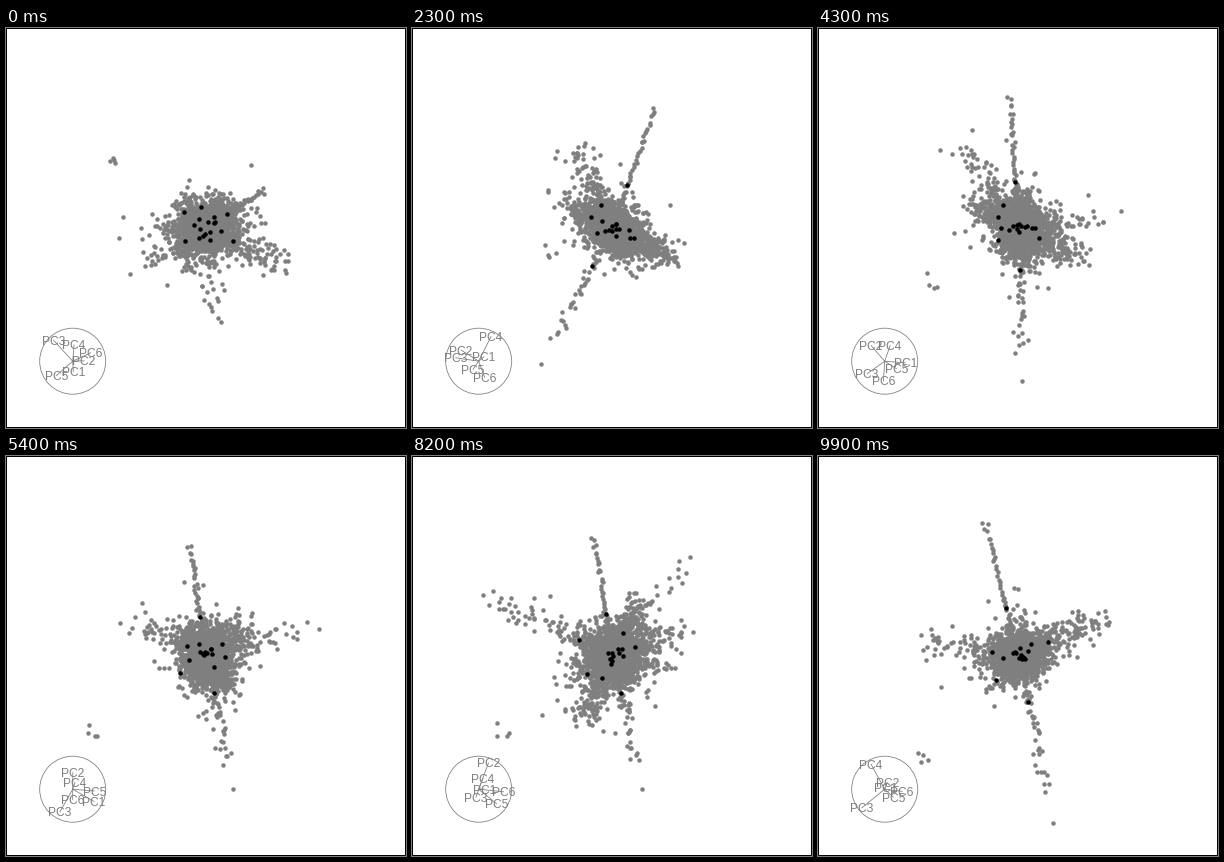
These frames come from a looping animation (400x400 px, 10000 ms). A matplotlib script:

```python
import numpy as np
import matplotlib.pyplot as plt
from matplotlib.animation import FuncAnimation
from matplotlib.patches import Circle, Rectangle

SIZE, FRAMES, INTERVAL = 400, 100, 100
GREY = "#7f7f7f"
PX = 0.72  # points per pixel
CENTRE = np.array([200.5, 199.5])
DIAL, RADIUS = np.array([66.7, 333.2]), 33
rng = np.random.default_rng(7)


def orthonormal(m):
    u, _, vt = np.linalg.svd(m, full_matrices=False)
    return u @ vt


# Stops of the tour: x row and y row of the projection of PC1..PC6.
STOPS = [0, 14, 31, 54, 68, 82, 99]
POSES = [orthonormal(np.array(p).T) for p in (
    [[.02, .35, -.59, .04, -.50, .55], [-.32, .01, .65, .50, -.44, .26]],
    [[-.17, -.20, -.74, .38, -.20, .44], [-.09, .455, .15, .82, -.09, -.27]],
    [[.40, -.74, -.50, .20, -.08, -.05], [.30, .24, .12, .545, -.33, -.64]],
    [[.65, 0, -.38, .07, .65, 0], [-.39, .515, -.70, .21, -.06, -.32]],
    [[.65, .17, .13, .55, .38, .36], [-.18, .97, .06, -.03, -.15, -.04]],
    [[.17, .29, -.08, .13, .56, .77], [0, .79, -.24, .33, -.45, -.09]],
    [[.02, .08, -.71, -.41, .26, .53], [.06, .21, -.58, .76, -.24, -.06]],
)]


def pose(k):
    """Constant-speed rotation between neighbouring stops."""
    i = min(np.searchsorted(STOPS, k, side="right") - 1, len(STOPS) - 2)
    t = (k - STOPS[i]) / (STOPS[i + 1] - STOPS[i])
    a, b = POSES[i], POSES[i + 1]
    angle = np.arccos(np.clip(np.sum(a * b) / 2, -1, 1))
    return orthonormal(np.sin((1 - t) * angle) * a + np.sin(t * angle) * b)


def noise(n):
    return np.clip(rng.normal(size=(n, 6)), -2.3, 2.3)


def arm(tip, n, power, spread):
    """Points along a ray, thinning out towards its tip."""
    t = np.linspace(0, 1, n)[:, None] ** power
    return t * tip + noise(n) * spread * (0.4 + 0.6 * t)


# Tips of the cloud's arms in PC space.
north, south, west, low, east, drop, rise, far = np.array([
    [-25, 60, -52, 108, -45, -35],
    [30, -42, 60, -105, 50, 30],
    [-10, 25, 30, 0, -80, -105],
    [20, -85, -25, -10, 0, -10],
    [15, 20, -70, 0, 10, 60],
    [48, 0, -68, 0, 68, 0],
    [80, 105, 10, 50, 0, 30],
    [-60, -70, 100, -50, -40, -50],
])

SD = np.array([10, 16, 11, 8, 11, 15])
cloud = np.vstack([
    noise(1700) * SD * rng.lognormal(0, 0.2, (1700, 1)),
    noise(170) * SD * rng.uniform(1.3, 2.4, (170, 1)),
    arm(north, 60, 1.7, 1.5),
    arm(south, 60, 1.8, 4),
    south * 1.25,
    arm(west, 130, 2.2, 9),
    arm(low, 190, 1.6, 7),
    arm(-0.8 * low, 190, 1.6, 7),
    arm(east, 160, 1.7, 9),
    arm(drop, 60, 1.8, 9),
    arm(rise, 50, 2, 9),
    far + 6 * noise(4),
])
marked = np.vstack([
    0.35 * np.array([north, south, 0.8 * west, low, -low, east, 0.7 * far]),
    noise(11) * 7,
])

fig = plt.figure(figsize=(SIZE / 100, SIZE / 100), dpi=100, facecolor="white")
ax = fig.add_axes([0, 0, 1, 1])
ax.set(xlim=(0, SIZE), ylim=(SIZE, 0))
ax.axis("off")

ax.add_patch(Rectangle((0.5, 0.5), SIZE - 1, SIZE - 1, fill=False,
                       ec="black", lw=PX, snap=False))
ax.add_patch(Circle(DIAL, RADIUS, fill=False, ec=GREY, lw=0.8 * PX))
spokes = [ax.plot([], [], color=GREY, lw=0.8 * PX)[0] for _ in range(6)]
labels = [ax.text(0, 0, f"PC{i + 1}", color=GREY, fontsize=12 * PX,
                  family="Liberation Sans", ha="center", va="center_baseline")
          for i in range(6)]
dots = [ax.plot([], [], "o", color=c, ms=4.5 * PX, mew=0, zorder=z)[0]
        for c, z in ((GREY, 5), ("black", 6))]


def draw(k):
    basis = pose(k) * [1, -1]
    for line, data in zip(dots, (cloud, marked)):
        line.set_data(*(CENTRE + data @ basis).T)
    for spoke, label, end in zip(spokes, labels, DIAL + RADIUS * basis):
        spoke.set_data(*np.array([DIAL, end]).T)
        label.set_position(end)
    return [*spokes, *labels, *dots]


anim = FuncAnimation(fig, draw, frames=FRAMES, interval=INTERVAL,
                     repeat=True, repeat_delay=0)
plt.show()
```
